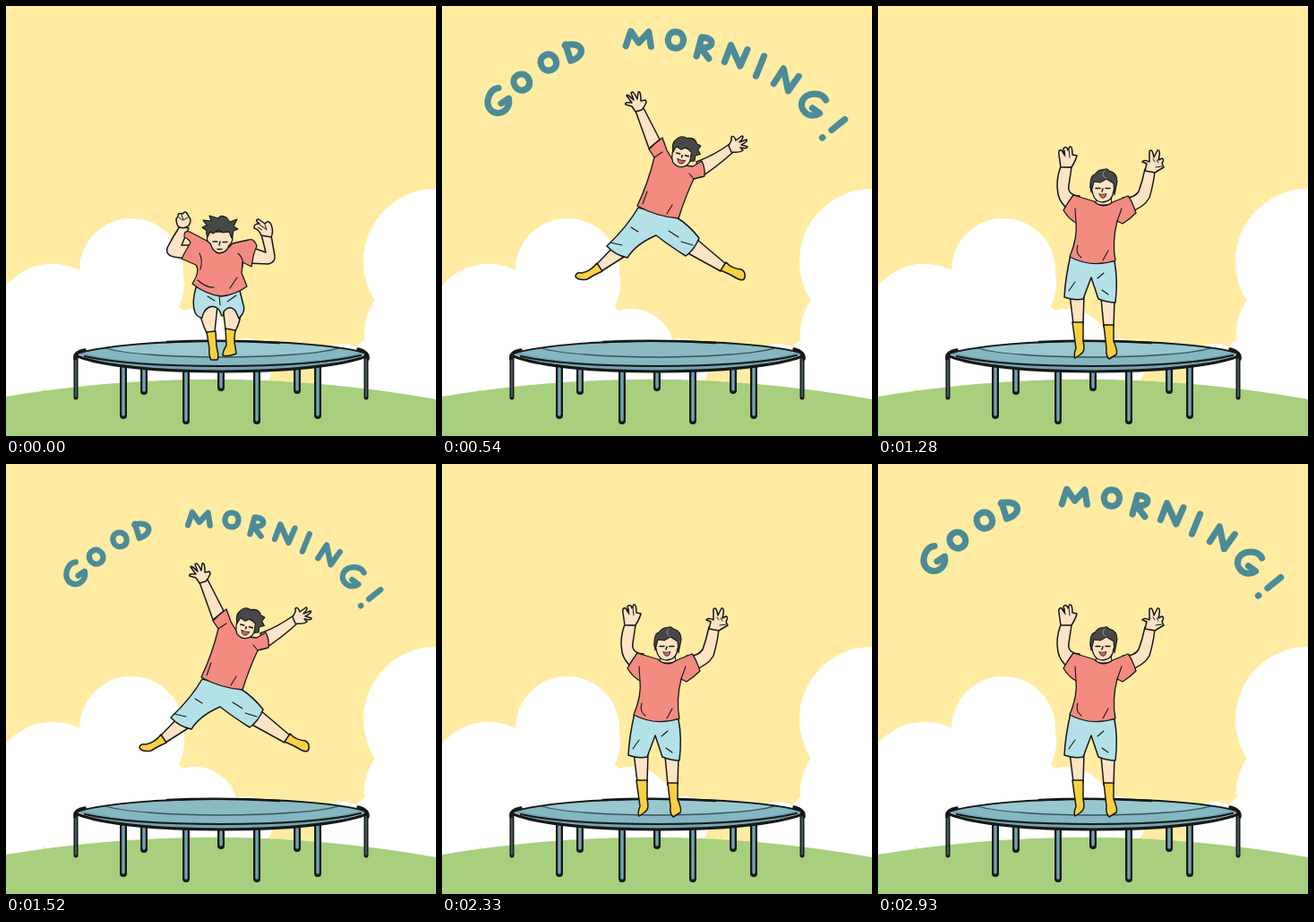
These frames come from a looping animation (480 px wide and 480 px high, 3.03 s). An HTML page with a canvas:

```html
<!DOCTYPE html>
<html lang="en">
<head>
<meta charset="utf-8">
<title>Good morning</title>
<style>
html, body { margin: 0; width: 100%; height: 100%; overflow: hidden; background: #ffeca2; }
canvas { display: block; width: 480px; height: 480px; }
</style>
</head>
<body>
<canvas id="stage" width="480" height="480" role="img" aria-label="GOOD MORNING!">GOOD MORNING!</canvas>
<script>
const ctx = document.getElementById('stage').getContext('2d');
const INK = '#171717', SKIN = '#fee4c4', SHIRT = '#f38b81', SHORTS = '#b4e1e8',
      SOCK = '#f9d040', HAIR = '#484848', MOUTH = '#dd6a60',
      RIM = '#6fa5b0', MAT = '#98c7cf', TAUT = '#8abac4', LETTER = '#4c8b98';
const LOOP = 3030;

ctx.lineCap = ctx.lineJoin = 'round';

function fill(d, color) {
  ctx.fillStyle = color;
  ctx.fill(new Path2D(d));
}

function line(d, width = 1.5, color = INK) {
  ctx.strokeStyle = color;
  ctx.lineWidth = width;
  ctx.stroke(new Path2D(d));
}

function shape(d, color, width = 1.5) {
  fill(d, color);
  line(d, width);
}

function disc(x, y, r, color) {
  ctx.fillStyle = color;
  ctx.beginPath();
  ctx.arc(x, y, r, 0, Math.PI * 2);
  ctx.fill();
}

function drawSky() {
  ctx.fillStyle = '#ffeca2';
  ctx.fillRect(0, 0, 480, 480);
  const puffs = [[140, 295, 58], [145, 310, 54], [52, 356, 68], [0, 400, 50], [90, 410, 50],
                 [150, 380, 62], [211, 386, 48], [268, 401, 30],
                 [480, 285, 81], [470, 367, 70], [376, 408, 31], [425, 410, 45], [480, 420, 40]];
  for (const [x, y, r] of puffs) disc(x, y, r, '#fff');
  fill('M0 436Q240 396 480 439V480H0Z', '#a7cf7d');
}

function drawTrampoline(mat) {
  // x, top and bottom of each leg
  const legs = [[78, 390, 437], [131, 402, 457], [154, 404, 430], [201, 406, 463], [240, 406, 426],
                [280, 406, 463], [325, 404, 429], [348, 402, 457], [402, 390, 437]];
  for (const [x, top, end] of legs) {
    const outer = x < 100 || x > 400;
    line(`M${x} ${top}V${end}`, outer ? 5 : 8);
    line(`M${x} ${top}V${end - 1}`, outer ? 1 : 3.4, RIM);
  }
  fill('M79 388C110 379 170 374 240 374S375 379 403 388C375 401 310 408 240 408S105 401 79 388Z', RIM);
  fill('M86 387C120 379 175 375 240 375S365 380 396 387C360 396 305 401 240 401S118 396 86 387Z', '#84b7c1');
  fill('M111 383C150 377 200 375 240 375S335 377 371 383C340 389 295 392 240 392S140 389 111 383Z', mat);
  line('M111 382C130 388 185 392 240 392S350 388 371 382', 1.3, '#37545b');
  line('M79 388C110 379 170 374 240 374S375 379 403 388', 2);
  line('M180 375Q240 372 305 376', 2.6);
  line('M88 391C125 399 180 402 240 402S357 399 396 390', 2);
  line('M80 391C108 402 170 408 240 408S374 402 402 391', 3.2);
  line('M77 394Q76 386 88 384M404 394Q405 386 393 383', 3.4);
}

function crouch() {
  shape('M215 336Q217 350 224 365L233 364L236 335Z', SKIN);
  shape('M242 335L245 361L256 363Q263 350 262 336Z', SKIN);
  shape('M224 364L234 363L235 380Q238 391 236 395L229 395Q226 390 227 382Z', SOCK);
  shape('M245 360L256 362Q254 374 256 381L257 388Q247 392 242 390Q242 385 246 379Z', SOCK);
  shape('M212 314Q207 332 211 342Q214 348 219 348Q220 340 227 336Q235 334 239 341Q242 351 243 341Q250 333 256 340L260 349Q268 340 265 334L261 318Z', SHORTS);
  line('M238 323L239 334M225 324L233 329M247 330L257 323', 1.1);

  shape('M194 246Q186 258 180 270Q178 278 187 280L207 283L211 267L196 267L204 248Z', SKIN);
  shape('M192 246Q188 238 192 235Q192 230 197 232Q201 227 204 235Q208 239 204 245Q200 249 194 247Z', SKIN);
  line('M196 233L198 239L203 236M193 236L197 239', 1);
  shape('M285 255L290 275L270 268L268 287L293 288Q301 286 300 279L296 256Z', SKIN);
  shape('M285 256Q282 249 277 248Q276 243 283 243Q277 239 282 238L289 243Q293 238 296 244Q299 252 296 258Z', SKIN);
  line('M283 244L290 249M289 244L291 250M281 247L286 250', 1);

  shape('M205 252Q198 250 199 258Q204 260 206 264Q200 274 196 282L212 289Q217 296 208 310Q223 322 240 324Q255 323 269 313L263 298L264 286L274 291Q276 276 280 268Q277 259 271 261L253 265Q240 280 226 263Z', SHIRT, 1.3);
  line('M216 276Q220 284 217 294M259 276Q266 282 264 292M214 306Q224 315 232 314M258 303L250 315', 1.1);
  shape('M226 252Q222 263 228 265Q231 275 238 276Q247 275 249 267Q255 263 252 252Z', SKIN, 1.3);
  shape('M225 258Q223 253 224 251L219 247L224 245L220 239L229 240L227 234L237 237Q239 232 246 236L250 241L258 238L254 246L259 249L254 251L252 259L249 252L242 253L237 250L231 254L228 252Z', HAIR, 1.1);
  line('M231 263H236M242 263.5H247M239 263L238 267M236 271.5H241', 1.4);
}

function stand() {
  shape('M214 322L218 355L229 355L230 322Z', SKIN);
  shape('M249 326L252 358L263 358L264 328Z', SKIN);
  shape('M217 353L229 353L229 374Q232 386 226 389L220 393Q218 390 221 382Z', SOCK);
  shape('M252 356L263 356L263 374Q268 386 266 389L258 394Q254 390 255 382Z', SOCK);
  shape('M215 278Q209 304 208 325Q219 329 229 327L238 303L246 327Q256 331 265 331Q268 306 264 285Z', SHORTS);
  line('M213 318L220 308M250 317L257 322M245 304L252 298', 1.1);

  shape('M204 179Q198 195 201 210Q203 220 214 229L225 212Q211 211 213 200L216 180Z', SKIN);
  shape('M204 180L202 166Q201 160 205 161L208 166L207 159Q211 156 212 161L214 157Q217 156 217 166L222 167Q221 172 216 180Z', SKIN);
  line('M208 161L209 168M213 160L214 169', 1);
  shape('M298 182Q295 196 291 207Q286 215 273 214L279 231Q297 225 303 214Q307 201 309 185Z', SKIN);
  shape('M298 184L300 176L295 174Q297 171 303 174L303 162Q306 158 308 169L312 161Q316 160 313 172L317 170Q320 171 317 176L319 180L309 186Z', SKIN);
  line('M307 171L309 174M311 172L313 175M310 180L317 179', 1);

  shape('M244 210L243 222L261 222L260 210Z', SKIN, 1);
  shape('M218 211Q212 219 207 228Q213 238 221 242Q223 258 214 280Q239 293 265 284Q261 264 267 240L273 243Q281 238 288 231Q283 216 279 212L262 219Q251 227 241 218Z', SHIRT, 1.3);
  line('M220 226L221 242M267 240L272 226M223 267Q220 276 227 281M257 273L251 284', 1.1);
  shape('M239 194Q235 203 239 206Q241 219 251 219Q262 218 263 206Q267 203 265 192Z', SKIN, 1.3);
  shape('M238 208Q235 190 242 188Q246 182 254 182Q255 181 258 184Q267 186 267 196L264 211L263 198L255 193L248 197L241 196Z', HAIR, 1.1);
  line('M253 184Q248 189 255 193', 0.8, '#aaa');
  line('M243 203.5H248M254 203.5H259M251 204L250 207', 1.5);
  shape('M247 210Q251 211 255 209.5Q254 214.5 251 214.5Q248 214 247 210Z', MOUTH, 0.8);
}

function star() {
  shape('M194 266L172 289L178 296L211 275Z', SKIN);
  shape('M271 274L311 296L317 288L284 260Z', SKIN);
  shape('M173 287L179 296Q170 300 162 305Q153 307 149 302Q149 297 156 298Q166 296 173 287Z', SOCK);
  shape('M317 286L311 295Q321 299 329 304Q337 308 338 303Q339 296 334 294Q323 293 317 286Z', SOCK);
  shape('M219 225Q207 246 184 268Q193 278 207 281Q216 266 239 256Q253 267 272 279Q282 272 287 259Q276 245 262 236Z', SHORTS);
  line('M188 264L201 267M211 247L219 252M267 263L280 267M253 251L264 258', 1.1);

  shape('M216 117L231 159L243 149L225 114Z', SKIN);
  shape('M216 118L212 112L205 110Q203 107 212 108L206 100Q206 97 214 105L211 97Q213 93 218 104L219 96Q222 94 222 106L227 105Q230 107 223 116Z', SKIN);
  shape('M321 154Q305 166 284 174L289 191Q306 180 324 164Z', SKIN);
  shape('M320 156L323 150L323 146Q326 144 328 150L335 145Q338 146 332 152L340 149Q342 151 334 155L341 157Q341 160 333 158L336 161Q333 164 323 163Z', SKIN);

  shape('M231 160Q238 153 246 147L251 161Q257 172 262 177L280 179L290 173Q294 181 293 190L281 193Q272 212 264 237Q239 235 218 223Q230 198 237 169Z', SHIRT, 1.3);
  line('M237 169L246 163M281 193L276 187M229 207L224 221M257 222L251 232', 1.1);
  ctx.save();
  ctx.translate(269, 164);
  ctx.rotate(0.28);
  shape('M-11 -7Q-13 6 -8 13Q0 19 7 13Q12 8 11 -5Z', SKIN, 1.3);
  shape('M-11 2Q-16 -7 -11 -13Q-8 -19 0 -17Q8 -21 12 -14L17 -13L15 -8L19 -4L14 -1L15 5L10 7L9 -3L2 -7L-3 -3L-9 -5Z', HAIR, 1.1);
  line('M-7 2H-3M3 2H7M0 3V5', 1.6);
  shape('M-4 8Q0 9 5 7.5Q4 12.5 0 12.5Q-3 12 -4 8Z', MOUTH, 0.8);
  ctx.restore();
}

const glyphs = {
  G: 'M8 -12C-1 -17 -14 -7 -13 3C-11 15 6 17 11 4L1 4',
  O: 'M-1 -9C-12 -8 -11 9 0 9C12 9 11 -10 -1 -9Z',
  D: 'M-7 -9L-6 10C14 9 13 -9 -8 -8',
  M: 'M-14 9L-10 -8L0 4L10 -9L14 7',
  R: 'M-6 12L-6 -10C10 -14 11 1 -5 1L8 11',
  N: 'M-10 10L-9 -10L8 9L10 -11',
  I: 'M0 -12V12',
  '!': 'M0 -15V4M0 -14V-6M0 17V17.5'
};

// letter, x, y, turn in degrees
const greeting = [
  ['G', 63, 106, -34], ['O', 89, 85, -28], ['O', 119, 63, -20], ['D', 147, 50, -14],
  ['M', 220, 37, 5], ['O', 261, 38, 8], ['R', 293, 46, 15], ['N', 328, 56, 18],
  ['I', 355, 67, 22], ['N', 384, 83, 30], ['G', 415, 110, 36], ['!', 438, 136, 51]
];

function drawGreeting(scale) {
  ctx.save();
  ctx.translate(187, 241);
  ctx.scale(scale, scale);
  ctx.translate(-187, -241);
  for (const [ch, x, y, turn] of greeting) {
    ctx.save();
    ctx.translate(x, y);
    ctx.rotate(turn * Math.PI / 180);
    line(glyphs[ch], 7.2, LETTER);
    ctx.restore();
  }
  ctx.restore();
}

// start in ms, pose, height offset, greeting scale (0 hides it)
const steps = [
  [0, crouch, 0, 0], [130, stand, 0, 0], [200, stand, -25, 0], [270, star, 40, 0],
  [340, star, 20, 0.88], [410, star, 9, 0.95], [470, star, 3, 1], [540, star, 0, 1],
  [740, star, 40, 1], [840, stand, 0, 1], [910, crouch, 0, 1], [1010, crouch, 0, 1.064],
  [1110, crouch, 0, 0],
  [1280, stand, 0, 0], [1350, stand, -25, 0], [1410, star, 36, 0], [1470, star, 15, 0.88],
  [1530, star, 4, 0.96], [1590, star, 0, 1],
  [1790, star, 40, 1], [1890, stand, 0, 1], [1960, crouch, 0, 1], [2030, crouch, 0, 1.03],
  [2080, crouch, 0, 1.064], [2130, crouch, 0, 0],
  [2330, stand, 0, 0], [2360, stand, -25, 0], [2410, star, 40, 0], [2460, star, 20, 0.88],
  [2520, star, 9, 0.95], [2580, star, 3, 1], [2630, star, 0, 1],
  [2830, star, 40, 1], [2930, stand, 0, 1]
];

const began = performance.now();

function draw() {
  const t = (performance.now() - began) % LOOP;
  const [, pose, rise, scale] = steps.findLast(s => s[0] <= t) || steps[0];
  drawSky();
  drawTrampoline(pose === star ? TAUT : MAT);
  if (scale) drawGreeting(scale);
  ctx.save();
  ctx.translate(0, rise);
  pose();
  ctx.restore();
  requestAnimationFrame(draw);
}
draw();
</script>
</body>
</html>
```
